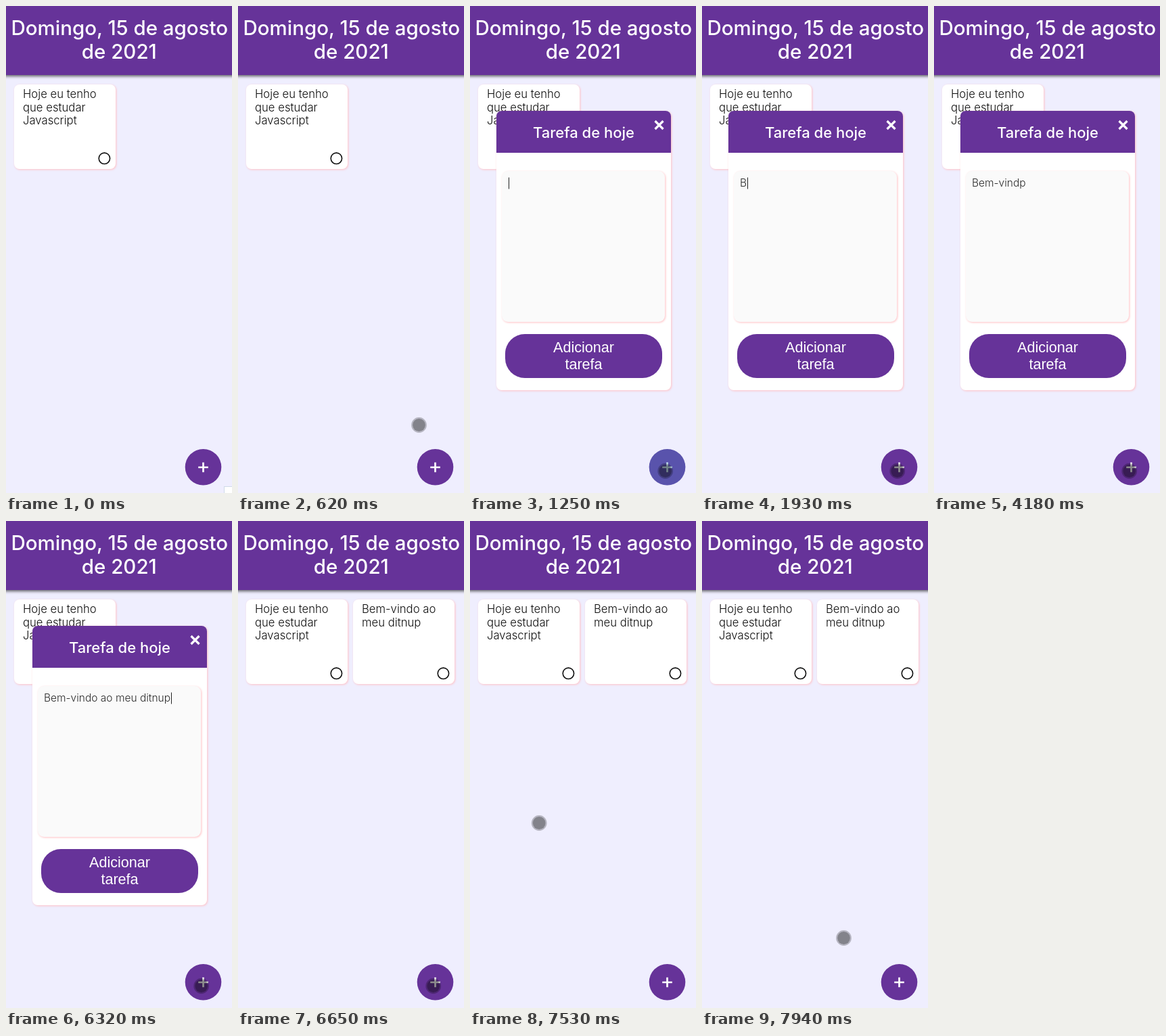
An HTML page that plays this animation: 334x720 px, repeating every 8000 ms.

```html
<!DOCTYPE html>
<html lang="pt-BR">
<head>
<meta charset="utf-8">
<title>Tarefas</title>
<style>
  html, body { margin: 0; width: 100%; height: 100%; overflow: hidden; background: #efeefe; }
  svg { display: block; width: 334px; height: 720px; }
  text { font-family: Inter, "Open Sans", sans-serif; white-space: pre; }
  .date { font-size: 29.5px; font-weight: 500; fill: #fff; text-anchor: middle; }
  .note { font-size: 16.7px; font-weight: 350; fill: #111; }
  .head { font-size: 22px; font-weight: 500; fill: #fff; text-anchor: middle; }
  .typed { font-size: 15.5px; font-weight: 350; fill: #2b2b2b; }
  .btn { font-family: "Liberation Sans", Arial, sans-serif; font-size: 21.6px; fill: #fff; text-anchor: middle; }
  .purple { fill: #639; }
  .pink { filter: drop-shadow(1.5px 1.5px 1.5px #ffc0c4); }
  .bar { filter: drop-shadow(0 2px 2px rgba(0, 0, 0, .6)); }
</style>
</head>
<body>
<svg viewBox="0 0 334 720">
  <rect width="334" height="720" fill="#efeefe"/>
  <rect class="purple bar" x="-10" y="-10" width="354" height="112"/>
  <text class="date" x="167.8" y="42.5">Domingo, 15 de agosto</text>
  <text class="date" x="167.3" y="77.5">de 2021</text>

  <g id="cards"></g>

  <rect id="corner" x="322.5" y="710.5" width="14" height="12" fill="#fff" stroke="#cfdae8"/>

  <circle class="purple" cx="291.5" cy="681.8" r="26.8"/>
  <path d="M284.2 682h14.6M291.5 674.7v14.6" stroke="#fff" stroke-width="2.7"/>
  <circle id="tap" cx="291.5" cy="681.8" r="26.8" fill="#33b5e5"/>

  <g id="modal">
    <rect class="pink" x="39" y="155" width="258" height="413" rx="8" fill="#fff"/>
    <path class="purple" d="M39 217V163a8 8 0 0 1 8-8H289a8 8 0 0 1 8 8V217z"/>
    <text class="head" x="168" y="194.5">Tarefa de hoje</text>
    <path d="M273.5 170l12 12m0-12l-12 12" stroke="#fff" stroke-width="3.2"/>
    <rect class="pink" x="47" y="244" width="241" height="223" rx="9" fill="#fafafa"/>
    <text id="typed" class="typed" x="56" y="267"></text>
    <rect id="caret" y="253.5" width="1" height="17" fill="#222"/>
    <rect class="purple" x="52" y="485" width="232" height="65" rx="29"/>
    <text class="btn" x="168" y="512">Adicionar</text>
    <text class="btn" x="168" y="537">tarefa</text>
  </g>

  <g id="cursor">
    <circle r="10.4" fill="none" stroke="#000" stroke-opacity=".24" stroke-width="2"/>
    <circle r="9.4" fill="#000" fill-opacity=".45"/>
  </g>
</svg>
<script>
const LOOP = 8000, OPEN = 1250, SUBMIT = 6650, STEP = 70;
const el = id => document.getElementById(id);
const show = (node, on) => node.setAttribute('visibility', on ? 'inherit' : 'hidden');

function addCard(x, lines) {
  const rows = lines.map((s, i) =>
    `<text class="note" x="${x + 13}" y="${136 + 19.5 * i}">${s}</text>`).join('');
  el('cards').insertAdjacentHTML('beforeend',
    `<g><rect class="pink" x="${x}" y="116" width="150" height="125" rx="8" fill="#fff"/>${rows}` +
    `<circle cx="${x + 133.4}" cy="225.3" r="8.2" fill="none" stroke="#111" stroke-width="1.6"/></g>`);
  return el('cards').lastChild;
}
addCard(12, ['Hoje eu tenho', 'que estudar', 'Javascript']);
const newCard = addCard(170, ['Bem-vindo ao', 'meu ditnup']);

// Keystrokes: [time, key]; '<' deletes the last letter
const keys = [
  [1930, 'B'], [2190, 'e'], [2390, 'm'], [2720, '-'], [3050, 'v'], [3120, 'i'], [3250, 'n'],
  [3580, 'd'], [3650, 'p'], [4310, '<'], [4580, 'o'],
  ...[...' ao meu'].map((c, i) => [4730 + 110 * i, c]),
  [5650, ' '], [5720, 'd'], [5850, 'i'], [6050, 't'], [6120, 'n'], [6250, 'u'], [6320, 'p']
];

// Pointer path: [time, x, y]
const path = [
  [200, 322, 668], [340, 235.5, 598.5], [620, 267.5, 619.5], [830, 284.5, 672.5],
  [1110, 288.7, 687.5], [7240, 288.7, 687.5], [7590, 80.5, 418.5], [7940, 209.5, 616.5]
];

function pointerAt(t) {
  const i = path.findIndex(p => p[0] > t);
  if (i < 0) return path[path.length - 1].slice(1);
  const [t0, x0, y0] = path[i - 1], [t1, x1, y1] = path[i];
  const u = (t - t0) / (t1 - t0), e = u * u * (3 - 2 * u);
  return [x0 + (x1 - x0) * e, y0 + (y1 - y0) * e];
}

function drawModal(t) {
  const open = t >= OPEN && t < SUBMIT;
  show(el('modal'), open);
  if (!open) return;
  let text = '', last = OPEN;
  for (const [at, key] of keys) {
    if (at > t) break;
    text = key === '<' ? text.slice(0, -1) : text + key;
    last = at;
  }
  const typed = el('typed');
  typed.textContent = text;
  const width = text ? typed.getComputedTextLength() : 0;
  el('caret').setAttribute('x', Math.round(56.5 + width));
  show(el('caret'), (t - last) % 1000 < 480);
}

function draw(t) {
  show(el('corner'), t < 70);
  show(newCard, t >= SUBMIT);
  const glow = t >= OPEN && t < 1450 ? 0.25 * (1 - (t - OPEN) / 200) : 0;
  el('tap').setAttribute('opacity', glow);
  drawModal(t);

  show(el('cursor'), t >= 200);
  if (t >= 200) {
    // The pointer moves in visible ticks
    const base = t < 7240 ? 200 : 7240;
    const [x, y] = pointerAt(base + Math.floor((t - base) / STEP) * STEP);
    el('cursor').setAttribute('transform', `translate(${x.toFixed(1)} ${y.toFixed(1)})`);
  }
}

const start = performance.now();
function frame() {
  draw((performance.now() - start) % LOOP);
  requestAnimationFrame(frame);
}
frame();
</script>
</body>
</html>
```
